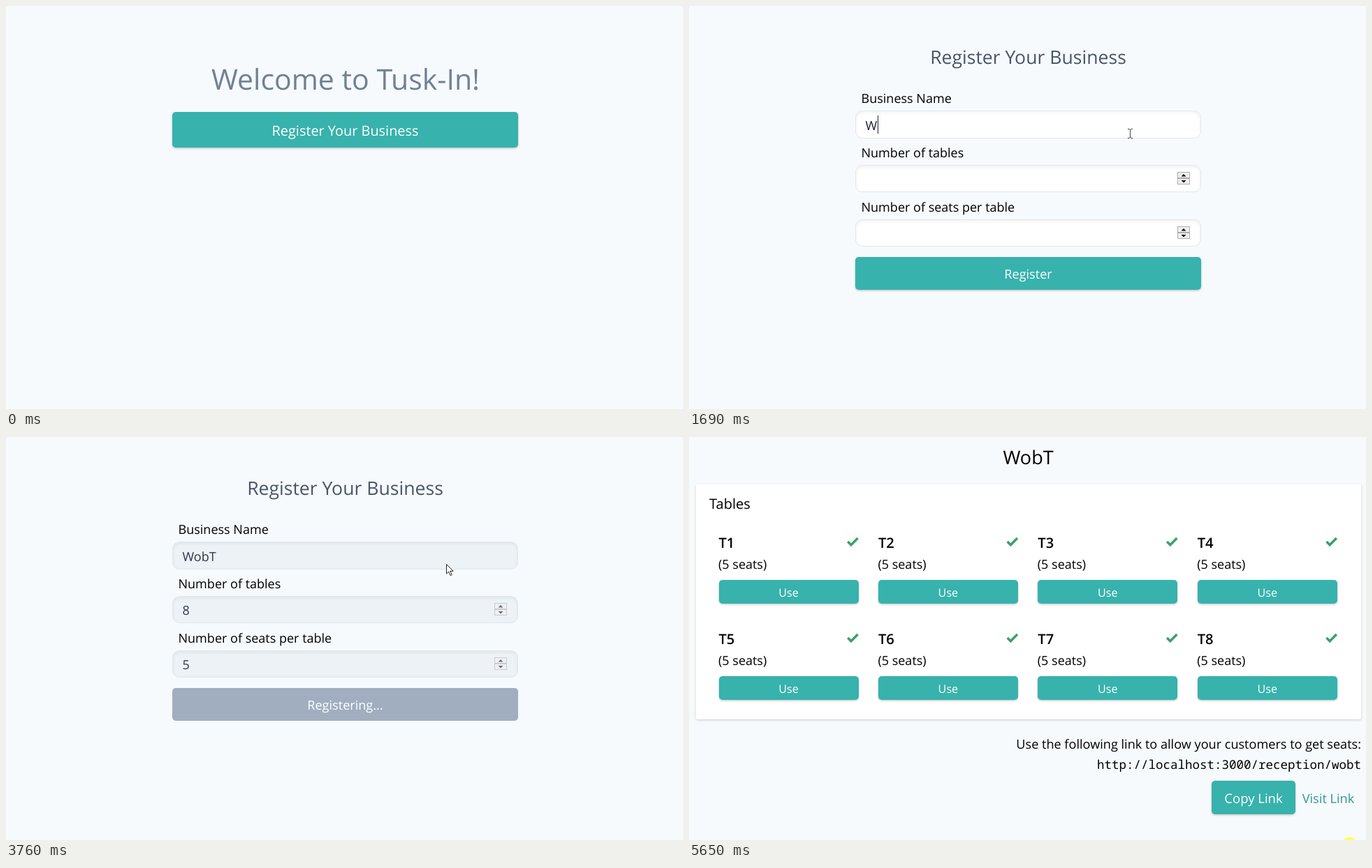
Animation of 969 by 578 pixels, one loop 5720 ms. Source, as an HTML page:

```html
<!DOCTYPE html>
<html lang="en">
<head>
<meta charset="utf-8">
<title>Table booking demo</title>
<style>
  html, body { margin: 0; width: 100%; height: 100%; overflow: hidden; background: #f6fafd; }
  #stage { position: relative; width: 969px; height: 578px; overflow: hidden; background: #f6fafd; }
  .scene, svg { position: absolute; left: 0; top: 0; width: 969px; height: 578px; }
  .box { position: absolute; box-sizing: border-box; }
  .button { background: #38b2ac; border-radius: 5px; box-shadow: 0 1.2px 3.6px rgba(0,0,0,.14), 0 1.2px 2.4px rgba(0,0,0,.1); }
  .input { background: #fff; border: 1px solid #e2e8f0; border-radius: 10px; box-shadow: inset 0 2px 5px rgba(0,0,0,.06); }
  .card { background: #fff; border-radius: 2px; box-shadow: 0 1px 4px rgba(0,0,0,.12), 0 1px 2px rgba(0,0,0,.08); }
  .busy .input { background: #edf2f7; }
  .busy .button { background: #a0aec0; box-shadow: none; }
  .busy .stepper { opacity: .55; }
  .busy .value { fill: #2d3748; }
  text { font-family: "Open Sans", "Noto Sans", sans-serif; white-space: pre; text-rendering: geometricPrecision; }
  .mono { font-family: "Noto Sans Mono", "DejaVu Sans Mono", monospace; }
</style>
</head>
<body>
<div id="stage"></div>
<script>
const LOOP = 5720;
const BUSINESS = "WobT";
const NS = "http://www.w3.org/2000/svg";
const MID = 485.5;
const stage = document.getElementById("stage");

function svgNode(parent, tag, attrs) {
  const node = document.createElementNS(NS, tag);
  for (const key in attrs) node.setAttribute(key, attrs[key]);
  return parent.appendChild(node);
}

function makeScene() {
  const el = document.createElement("div");
  el.className = "scene";
  stage.append(el);
  const svg = svgNode(el, "svg", {});
  return {
    el, svg,
    box(cls, x, y, w, h) {
      const b = document.createElement("div");
      b.className = "box " + cls;
      b.style.cssText = `left:${x}px;top:${y}px;width:${w}px;height:${h}px`;
      el.insertBefore(b, svg);
    },
    text(str, x, y, size, fill = "#000", anchor = "start", extra = {}) {
      const t = svgNode(svg, "text", { x, y, fill, "font-size": size, "text-anchor": anchor, ...extra });
      t.textContent = str;
      return t;
    }
  };
}

// Welcome page
const welcome = makeScene();
welcome.text("Welcome to Tusk-In!", MID + 0.5, 119.5, 41, "#718096", "middle");
welcome.box("button", 238, 152, 495, 51);
welcome.text("Register Your Business", MID, 185.5, 19.9, "#fff", "middle");

// Registration form
const form = makeScene();
form.text("Register Your Business", MID, 83, 26.6, "#4a5568", "middle");
const fields = ["Business Name", "Number of tables", "Number of seats per table"].map((label, i) => {
  const y = 150 + i * 77.8;
  form.text(label, 246.5, y - 11, 18);
  form.box("input", 238, y, 494.5, 39.5);
  if (i) addStepper(699, Math.round(y + 10));
  const value = form.text("", 252.5, y + 27.5, 18, "#1a202c", "start", { class: "value" });
  return { value, y };
});
form.box("button", 238, 360, 495, 47);
const submit = form.text("Register", MID, 391, 18.1, "#fff", "middle");
const caret = svgNode(form.svg, "rect", { width: 1, height: 26, fill: "#1a202c" });

function addStepper(x, y) {
  const g = svgNode(form.svg, "g", { class: "stepper", transform: `translate(${x} ${y})` });
  for (const top of [0.5, 9.5])
    svgNode(g, "rect", { x: 0.5, y: top, width: 17, height: 8, fill: "#f0f0f0", stroke: "#adadad" });
  svgNode(g, "path", { d: "M5.5 6.5L9 3L12.5 6.5ZM5.5 12L9 15.5L12.5 12Z", fill: "#000" });
}

// Table overview
const tables = makeScene();
tables.text(BUSINESS, MID, 39, 27, "#000", "middle");
tables.box("card", 9.5, 68, 952, 337);
tables.text("Tables", 29, 103, 20.1);
for (let i = 0; i < 8; i++) {
  const x = 43 + (i % 4) * 228.4;
  const y = i < 4 ? 0 : 138;
  tables.text("T" + (i + 1), x - 0.5, y + 158.5, 20.1, "#000", "start", { "font-weight": 600 });
  tables.text("(5 seats)", x - 1, y + 188.5, 18);
  tables.box("button", x - 0.5, y + 204.5, 200, 34);
  tables.text("Use", x + 99.5, y + 229, 16.2, "#fff", "middle");
  svgNode(tables.svg, "path", {
    d: `M${x + 184.3} ${y + 150}l4.7 4.8l9.6 -9.8`,
    fill: "none", stroke: "#38a169", "stroke-width": 3.4
  });
}
tables.text("Use the following link to allow your customers to get seats:", 962, 447, 18.1, "#000", "end");
tables.text("http://localhost:3000/reception/" + BUSINESS.toLowerCase(), 962, 476, 17.5, "#000", "end", { class: "mono" });
tables.box("button", 747.5, 492.5, 120.5, 48);
tables.text("Copy Link", 808, 524.5, 18.5, "#fff", "middle");
tables.text("Visit Link", 915, 524.5, 18.2, "#319795", "middle");

// Pointer shapes, drawn around their hot spot
const overlay = makeScene().svg;
const cursors = {
  arrow: svgNode(overlay, "path", {
    d: "M.5 .5V14L3.6 11.1L6 16.6L8.2 15.6L5.8 10.3H10Z", fill: "#fff", stroke: "#222"
  }),
  hand: svgNode(overlay, "path", {
    d: "M-1.5 12V2Q-1.5 .5 0 .5T1.5 2V7Q3 6 4.5 7.5Q6 6.8 7 8.3Q9 7.8 9 10V14Q9 17 7 20.5H-2.5Q-3 17.5-7 12.5Q-6.5 9.5-4 11.5Z",
    fill: "#fff", stroke: "#222"
  }),
  beam: svgNode(overlay, "path", {
    d: "M-3 -6.5H-1L.5 -5.5L2 -6.5H4M.5 -5.5V5.5M-3 6.5H-1L.5 5.5L2 6.5H4", fill: "none", stroke: "#444"
  })
};
const click = svgNode(overlay, "circle", { cx: 945.5, cy: 585, r: 11, fill: "#ffff55" });

// Tables of [start time, value]
const sceneSteps = [[0, welcome], [930, form], [3880, tables]];
const typing = [
  [[0, ""], [1690, BUSINESS.slice(0, 1)], [1850, BUSINESS.slice(0, 2)], [2050, BUSINESS.slice(0, 3)], [2250, BUSINESS]],
  [[0, ""], [3170, "8"]],
  [[0, ""], [3450, "5"]]
];
const caretSteps = [[0, -1], [1410, 0], [2490, 1], [2770, -1], [3010, 1], [3290, 2], [3560, -1]];
const approach = [[738, 394], [700, 310], [680, 274], [664, 260], [644, 226], [634, 206], [632, 182]];

function at(steps, t) {
  let value = steps[0][1];
  for (const [start, v] of steps) if (t >= start) value = v;
  return value;
}

const ease = p => p * p * (3 - 2 * p);

function pointer(t) {
  if (t < 120 || t >= 5120) return null;
  if (t < 900) {
    const k = Math.min(6, Math.floor((t - 120) / (400 / 6) + 1e-6));
    return [k === 6 ? "hand" : "arrow", ...approach[k]];
  }
  if (t < 3760) return ["beam", 631, 183];
  if (t < 4500) return ["arrow", 630, 182];
  const k = Math.min(8, Math.floor((t - 4500) / (550 / 8) + 1e-6));
  const p = ease((k + 1) / 9);
  return ["arrow", Math.round(630 + 313 * p), Math.round(182 + 385 * p)];
}

function draw(t) {
  const current = at(sceneSteps, t);
  for (const [, s] of sceneSteps) s.el.style.visibility = s === current ? "visible" : "hidden";

  fields.forEach((f, i) => { f.value.textContent = at(typing[i], t); });
  const busy = t >= 3760;
  form.el.classList.toggle("busy", busy);
  submit.textContent = busy ? "Registering..." : "Register";

  const focus = at(caretSteps, t);
  caret.style.display = focus < 0 ? "none" : "";
  if (focus >= 0) {
    const { value, y } = fields[focus];
    const width = value.textContent ? value.getComputedTextLength() : 0;
    caret.setAttribute("x", Math.round(253 + width));
    caret.setAttribute("y", Math.round(y + 6.5));
  }

  const p = pointer(t);
  for (const name in cursors) {
    const on = p && p[0] === name;
    cursors[name].style.display = on ? "" : "none";
    if (on) cursors[name].setAttribute("transform", `translate(${p[1]} ${p[2]})`);
  }
  cursors.beam.setAttribute("stroke", t < 930 ? "#8a6468" : "#444");
  click.style.display = t >= 5650 ? "" : "none";
}

const begin = performance.now();
function tick() {
  draw((performance.now() - begin) % LOOP);
  requestAnimationFrame(tick);
}
draw(0);
requestAnimationFrame(tick);
</script>
</body>
</html>
```
